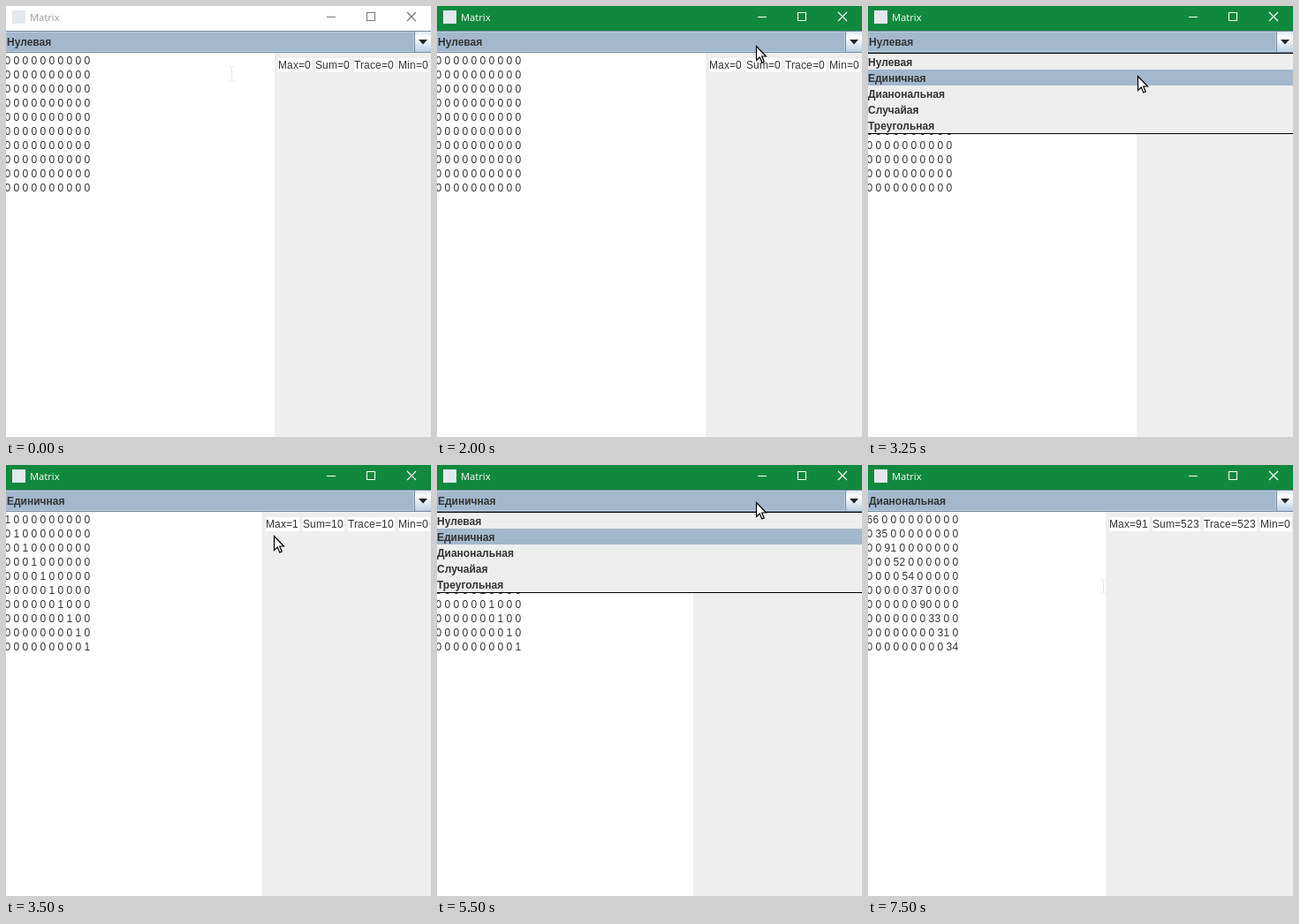
An HTML page that plays this animation: 481x488 px, repeating every 8000 ms.

```html
<!DOCTYPE html>
<html lang="ru">
<head>
<meta charset="utf-8">
<title>Matrix</title>
<style>
  html, body { margin: 0; width: 100%; height: 100%; overflow: hidden; background: #fff; }
  svg { display: block; width: 481px; height: 488px; }
  text { font: 12px "Liberation Sans", Arial, sans-serif; fill: #333; }
  .bold { font-weight: bold; }
  #title { font: 11.2px "Open Sans", "Noto Sans", sans-serif; }
  .crisp { shape-rendering: crispEdges; }
</style>
</head>
<body>
<svg viewBox="0 0 481 488">
  <defs>
    <linearGradient id="button" x2="0" y2="1">
      <stop offset="0" stop-color="#dde8f3"/>
      <stop offset=".3" stop-color="#fff"/>
      <stop offset="1" stop-color="#b8cfe5"/>
    </linearGradient>
  </defs>
  <rect width="481" height="488" fill="#fff"/>

  <rect id="bar" width="481" height="28"/>
  <rect x="7" y="5" width="15" height="15" fill="#e3e8ed"/>
  <text id="title" x="27" y="17">Matrix</text>
  <g id="controls" fill="none">
    <path class="crisp" d="M363 12.5H373M408.5 7.5H417.5V16.5H408.5Z"/>
    <path d="M454 7L464 17M464 7L454 17" stroke-width="1.2"/>
  </g>

  <g id="rows"></g>
  <rect id="panel" y="53" height="435" fill="#eee"/>
  <g id="stats"></g>

  <g class="crisp">
    <rect y="28" width="481" height="25" fill="#7a8a99"/>
    <rect y="29" width="462" height="23" fill="#b8cfe5"/>
    <rect y="30" width="461" height="21" fill="#a3b8cc"/>
    <rect x="463" y="29" width="18" height="23" fill="url(#button)"/>
  </g>
  <path d="M467 38H477L472 43.5Z" fill="#222"/>
  <text id="choice" class="bold" x="1" y="45"></text>

  <g id="popup">
    <rect y="53" width="481" height="92" fill="#000"/>
    <rect y="54" width="481" height="90" fill="#eee"/>
    <rect id="hover" width="481" height="18" fill="#a3b8cc"/>
  </g>

  <path id="beam" d="M-3 -7.5H-1L.5 -6.5L2 -7.5H4M.5 -6.5V7.5M-3 8.5H-1L.5 7.5L2 8.5H4" fill="none" stroke="#e8e8e8"/>
  <path id="arrow" d="M.5 .5V16.5L4.2 13L6.8 19L9.2 18L6.7 12H11.5Z" fill="#fff" stroke="#000" stroke-width="1.2"/>
</svg>
<script>
const LOOP = 8000, STEP = 250, ITEM = 18, POPUP_TOP = 54;
const FOCUS_AT = 500, OPEN_AT = [2500, 5250], PICK_AT = [3500, 6750];
const kinds = ['Нулевая', 'Единичная', 'Дианональная', 'Случайая', 'Треугольная'];
const diagonals = [
  Array(10).fill(0),
  Array(10).fill(1),
  [66, 35, 91, 52, 54, 37, 90, 33, 31, 34]
];

const home = { x: 255, y: 76 };
const moves = [
  { start: 250, steps: 3, x: 241, y: 2 },
  { start: 1250, steps: 4, x: 361, y: 45 },
  { start: 2500, steps: 5, x: 303, y: 80 },
  { start: 4000, steps: 4, x: 349, y: 45 },
  { start: 5000, steps: 1, x: 370, y: 41 },
  { start: 5500, steps: 1, x: 361, y: 42 },
  { start: 6000, steps: 3, x: 249, y: 99 },
  { start: 6750, steps: 2, x: 266, y: 137 }
];

const $ = id => document.getElementById(id);
const easeOut = p => 1 - (1 - p) ** 2;

// Glyphs advance by whole pixels, as in the toolkit's own text
const pen = document.createElement('canvas').getContext('2d');
pen.font = '12px "Liberation Sans", Arial, sans-serif';
const advance = char => Math.round(pen.measureText(char).width);
const widthOf = text => [...text].reduce((sum, char) => sum + advance(char), 0);

function add(parent, tag, attrs, text = '') {
  const el = document.createElementNS('http://www.w3.org/2000/svg', tag);
  for (const key in attrs) el.setAttribute(key, attrs[key]);
  el.textContent = text;
  return parent.appendChild(el);
}
function addGridText(parent, x, y, text) {
  const xs = [...text].map((_, i) => x + widthOf(text.slice(0, i)));
  add(parent, 'text', { x: xs.join(' '), y }, text);
}
function set(id, attrs) {
  for (const key in attrs) $(id).setAttribute(key, attrs[key]);
}
const show = (id, on) => set(id, { visibility: on ? 'visible' : 'hidden' });

kinds.forEach((kind, i) =>
  add($('popup'), 'text', { class: 'bold', x: 0, y: POPUP_TOP + ITEM * i + 14 }, kind));

let panelLeft;
function showMatrix(index) {
  const diagonal = diagonals[index];
  const matrix = diagonal.map((value, r) => diagonal.map((_, c) => c === r ? value : 0));
  const cells = matrix.flat();
  const sum = cells.reduce((a, b) => a + b);
  const trace = diagonal.reduce((a, b) => a + b);

  $('choice').textContent = kinds[index];
  $('rows').replaceChildren();
  $('stats').replaceChildren();
  matrix.forEach((row, r) => addGridText($('rows'), -1.5, 66 + 16 * r, row.join(' ')));

  // Labels are packed from the right with a fixed gap
  let x = 483;
  const labels = [`Min=${Math.min(...cells)}`, `Trace=${trace}`, `Sum=${sum}`, `Max=${Math.max(...cells)}`];
  for (const label of labels) {
    const width = widthOf(label);
    x -= width + 5;
    add($('stats'), 'rect', { x, y: 59, width: width + 1, height: 16, fill: '#fff' });
    addGridText($('stats'), x, 71, label);
  }
  panelLeft = x - 4;
  set('panel', { x: panelLeft, width: 481 - panelLeft });
}

function pointerAt(t) {
  let { x, y } = home;
  for (const move of moves) {
    if (t < move.start) break;
    const step = Math.floor((t - move.start) / STEP) + 1;
    const p = easeOut(Math.min(1, step / move.steps));
    x += (move.x - x) * p;
    y += (move.y - y) * p;
  }
  return [Math.round(x), Math.round(y)];
}

let shown = -1;
function draw(now) {
  const t = now % LOOP;
  const [x, y] = pointerAt(t);
  const focus = t >= FOCUS_AT;
  const index = PICK_AT.filter(time => time <= t).length;
  const open = t >= OPEN_AT[index];
  if (index !== shown) showMatrix(shown = index);

  set('bar', { fill: focus ? '#10893e' : '#fff' });
  set('title', { style: `fill:${focus ? '#fff' : '#999'}` });
  set('controls', { stroke: focus ? '#fff' : '#777' });

  const hovered = y >= POPUP_TOP ? Math.floor((y - POPUP_TOP) / ITEM) : index;
  show('popup', open);
  set('hover', { y: POPUP_TOP + ITEM * hovered });

  const overText = !open && y > 53 && x < panelLeft;
  show('beam', overText);
  show('arrow', !overText);
  set(overText ? 'beam' : 'arrow', { transform: `translate(${x} ${y})` });
}

const start = performance.now();
function tick() {
  draw(performance.now() - start);
  requestAnimationFrame(tick);
}
tick();
</script>
</body>
</html>
```
